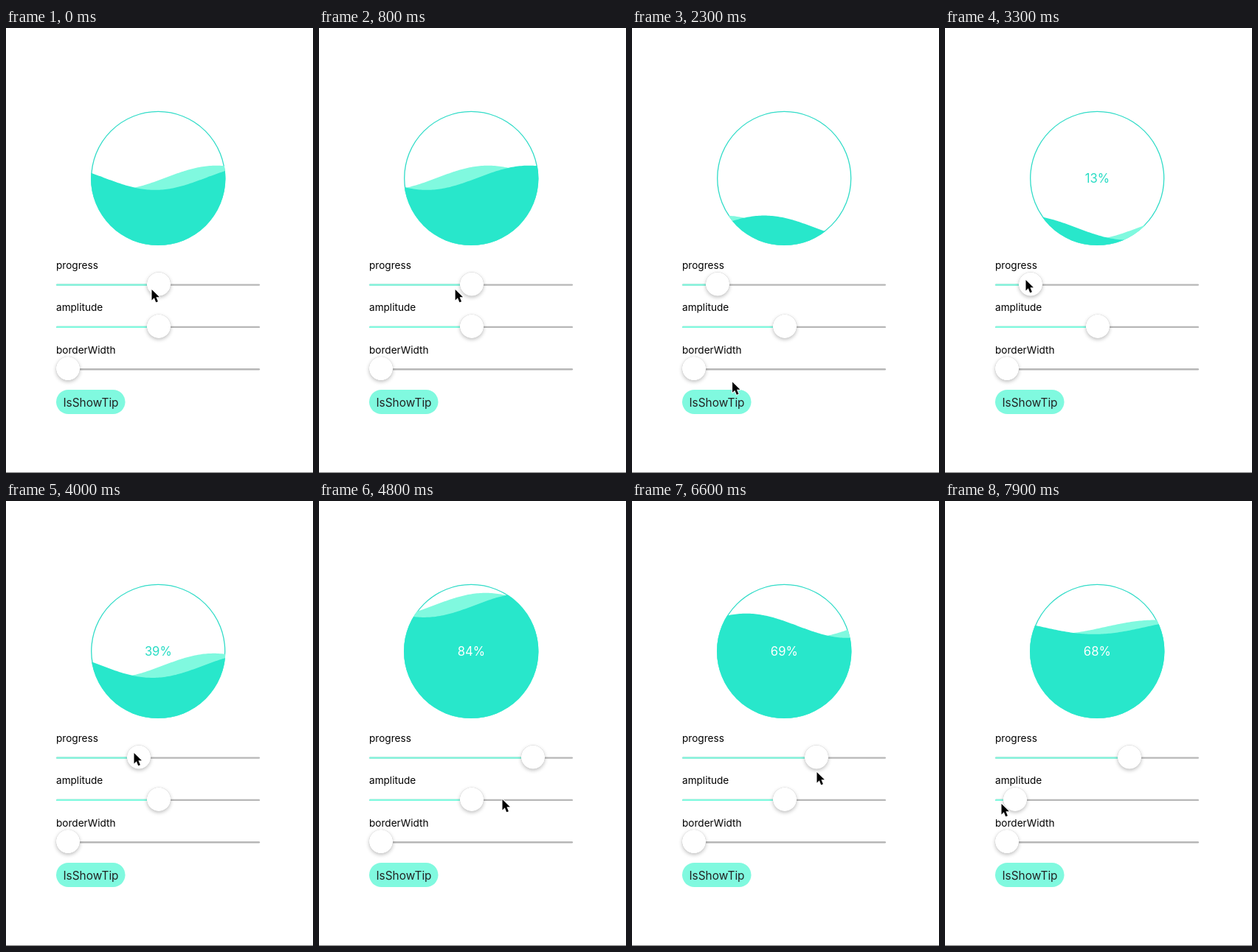
Animation, 416 px wide and 604 px high, one loop 8 s. Source, as an HTML page:

```html
<!DOCTYPE html>
<html lang="en">
<head>
<meta charset="utf-8">
<title>Wave progress</title>
<style>
  html, body { margin: 0; width: 100%; height: 100%; overflow: hidden; background: #fff; }
  svg { display: block; font-family: Inter, Roboto, sans-serif; }
  .knob { fill: #fff; filter: drop-shadow(0 0 .5px rgba(0,0,0,.32)) drop-shadow(0 2.8px 2.6px rgba(0,0,0,.24)); }
</style>
</head>
<body>
<svg id="stage" width="416" height="604" viewBox="0 0 416 604">
  <clipPath id="bowl"><circle cx="206.2" cy="203.9" r="91.2"/></clipPath>
  <circle cx="206.2" cy="203.9" r="90.5" fill="#fff" stroke="#32dcc8" stroke-width="1.3"/>
  <g clip-path="url(#bowl)">
    <path id="back" fill="#80f9df"/>
    <path id="front" fill="#28e7cb"/>
  </g>
  <text id="tip" x="206.3" y="210" font-size="16.6" text-anchor="middle"></text>
  <g id="sliders"></g>
  <rect x="68" y="491" width="93.5" height="33" rx="16.5" fill="#80f9df"/>
  <text x="115" y="513.5" font-size="15.4" text-anchor="middle" fill="#222">IsShowTip</text>
  <rect y="603" width="416" height="1" fill="#7c7c7c"/>
  <path id="cursor" d="M.5 1V15.4L3.8 12.3L6.2 18.3L8.9 17.2L6.4 11.3H10.9Z"
    stroke="#fff" stroke-width="1.8" paint-order="stroke" stroke-linejoin="round"/>
</svg>
<script>
const LOOP = 8000, STEP = 100;
const MIN_X = 84, TRAVEL = 244, MIDDLE = 207;
const KNOB_LAG = 150, WATER_LAG = 300;      // knob trails the hand, water trails the knob
const WAVE_LENGTH = 276, WAVE_SPEED = WAVE_LENGTH * 2 / 7900, BACK_SHIFT = 55;
const TIP_SHOWN = 2800;
const $ = id => document.getElementById(id);

// What the hand does: glide to a point, or drag a knob to x.
const glide = (from, to, x, y) => ({ from, to, x, y });
const drag = (knob, from, to, x) => ({ knob, from, to, x });
const actions = [
  drag('progress', 680, 1530, 116),
  glide(1700, 2450, 139, 494),
  glide(2900, 3300, 109, 341),
  drag('progress', 3350, 3550, 180),
  drag('progress', 4000, 4300, 290),
  glide(4450, 4800, 248, 404),
  glide(5300, 5750, 290, 367),
  drag('progress', 5850, 6170, 250),
  glide(6650, 7100, 188, 410),
  drag('amplitude', 7150, 7750, 95)
];

const done = (a, t) => Math.min(1, Math.max(0, (t - a.from) / (a.to - a.from)));
const smooth = k => k * k * (3 - 2 * k);

function handAt(t) {
  const hand = { x: 197, y: 354, progress: MIDDLE, amplitude: MIDDLE };
  for (const a of actions) {
    const k = done(a, t);
    if (a.knob) {
      const dx = (a.x - hand[a.knob]) * k;
      hand[a.knob] += dx;
      hand.x += dx;
    } else {
      hand.x += (a.x - hand.x) * smooth(k);
      hand.y += (a.y - hand.y) * smooth(k);
    }
  }
  return hand;
}

const share = x => (x - MIN_X) / TRAVEL;

function make(tag, attrs, text = '') {
  const el = document.createElementNS('http://www.w3.org/2000/svg', tag);
  for (const k in attrs) el.setAttribute(k, attrs[k]);
  el.textContent = text;
  return $('sliders').appendChild(el);
}

function slider(name, y) {
  make('text', { x: 68, y: y - 21.5, 'font-size': 13.6, fill: '#000' }, name);
  const track = { x: 68, y: y - 1.2, height: 2.4, rx: 1.2 };
  make('rect', { ...track, width: 276, fill: '#b7b7b7' });
  const fill = make('rect', { ...track, fill: '#80f9df' });
  const knob = make('circle', { cy: y - 1, r: 16.1, class: 'knob' });
  return x => {
    fill.setAttribute('width', x - 68);
    knob.setAttribute('cx', x);
  };
}

const [setProgress, setAmplitude, setBorder] =
  ['progress', 'amplitude', 'borderWidth'].map((name, i) => slider(name, 348.6 + 57.3 * i));
setBorder(MIN_X);

function wave(mid, amp, trough) {
  let d = 'M112 300';
  for (let x = 112; x <= 300; x += 2) {
    const y = mid + amp * Math.cos((x - trough) * 2 * Math.PI / WAVE_LENGTH);
    d += `L${x} ${y.toFixed(2)}`;
  }
  return d + 'L300 300Z';
}

function draw(t) {
  const hand = handAt(t), knobs = handAt(t - KNOB_LAG);
  setProgress(knobs.progress);
  setAmplitude(knobs.amplitude);
  $('cursor').setAttribute('transform', `translate(${hand.x} ${hand.y})`);

  const level = share(handAt(t - KNOB_LAG - WATER_LAG).progress);
  const mid = 295 - 182 * level, amp = 9 + 15 * share(knobs.amplitude);
  const trough = 202 - WAVE_SPEED * t;
  $('front').setAttribute('d', wave(mid, amp, trough));
  $('back').setAttribute('d', wave(mid, amp, trough - BACK_SHIFT));

  $('tip').textContent = t >= TIP_SHOWN ? Math.round(level * 100) + '%' : '';
  $('tip').setAttribute('fill', level >= .5 ? '#fff' : '#28dcc4');
}

const start = performance.now();
function tick() {
  const t = (performance.now() - start) % LOOP;
  draw(Math.floor(t / STEP) * STEP);
  requestAnimationFrame(tick);
}
tick();
</script>
</body>
</html>
```
